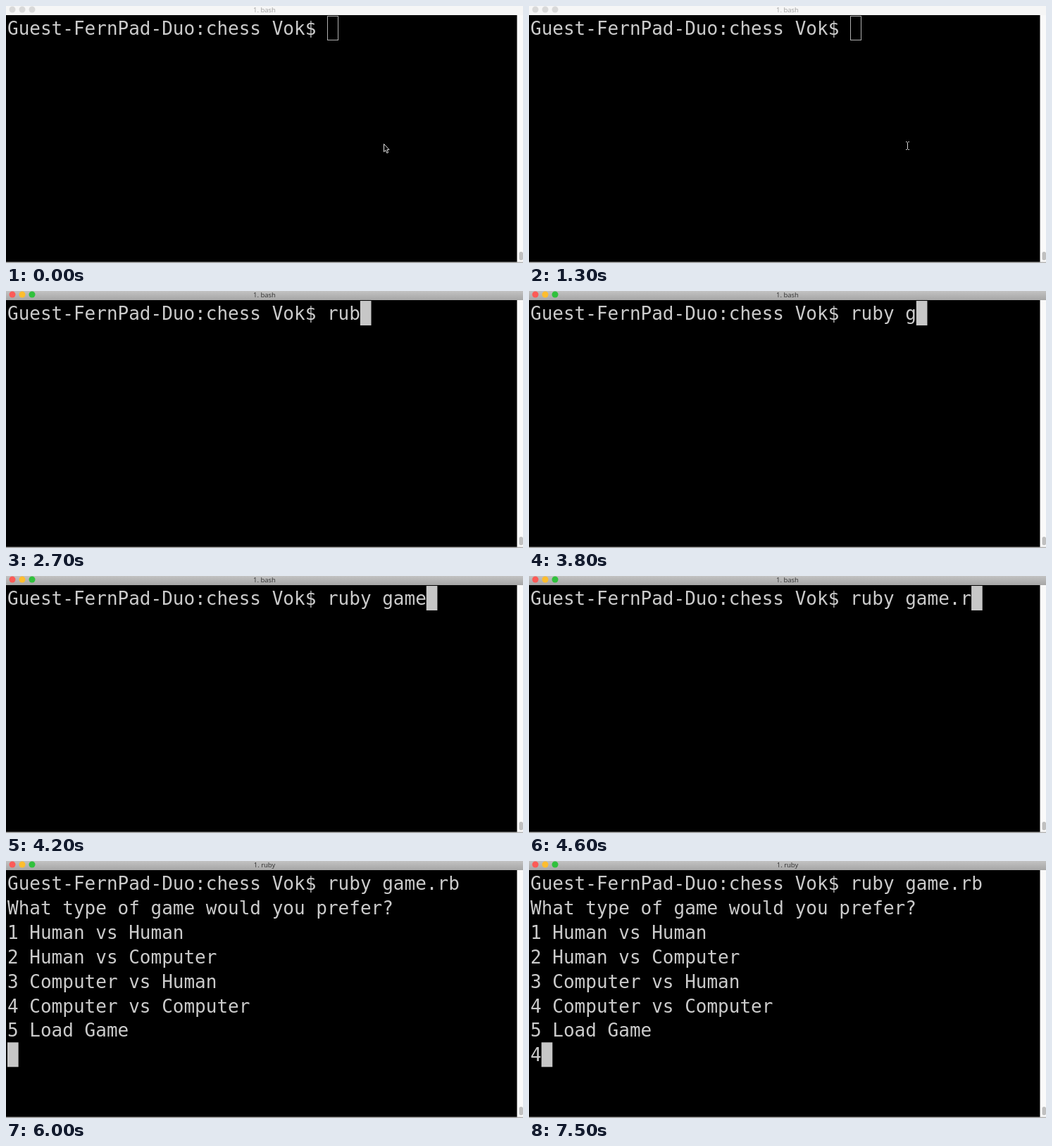
Write an HTML page that moves like this. It is 734 by 366 pixels and loops after 8 s.

```html
<!DOCTYPE html>
<html lang="en">
<head>
<meta charset="utf-8">
<title>Terminal</title>
<style>
  html, body { margin: 0; width: 100%; height: 100%; overflow: hidden; background: #000; }
  svg { display: block; }
  .term { font: 26px "DejaVu Sans Mono", monospace; fill: #cbcbcb; white-space: pre; }
  .title { font: 9.5px "Open Sans", sans-serif; text-anchor: middle; }
</style>
</head>
<body>
<svg width="734" height="366" viewBox="0 0 734 366">
  <defs>
    <linearGradient id="bar" x2="0" y2="1">
      <stop offset="0" stop-color="#c2c2c2"/>
      <stop offset="1" stop-color="#a6a6a6"/>
    </linearGradient>
  </defs>
  <rect width="734" height="366"/>
  <rect id="head" width="734" height="13"/>
  <g id="dots"></g>
  <text id="title" class="title" x="367" y="8.5"></text>

  <rect x="725.5" y="13" width="8.5" height="353" fill="#fafafa"/>
  <rect x="728.5" y="350" width="5.5" height="12" rx="2.5" fill="#c0c0c0"/>
  <rect y="364.5" width="734" height="1.5" fill="#b5b5b5"/>

  <g id="lines" class="term"></g>
  <rect id="caret"/>
  <path id="arrow" d="M536.5 196.5v11.2l2.5-2.3 1.8 4 1.9-.9-1.8-3.8h3.2z"
        fill="#000" stroke="#e4e4e4" stroke-width="1"/>
  <path id="beam" d="M535 193.5h1.5l1 1 1-1h1.5M537.5 194.5v9M535 204.5h1.5l1-1 1 1h1.5"
        fill="none" stroke="#d8d8d8" stroke-width="1"/>
</svg>
<script>
const LOOP = 8000;
const CELL = 15.652, ROW = 34.9, LEFT = 2, TOP = 14, BASE = 41;
const FOCUS = 1400, BEAM = 1000, ENTER = 5200, OUTPUT = 5300, RENAME = 6000, ANSWER = 7500;

const prompt = "Guest-FernPad-Duo:chess Vok$ ";
const command = "ruby game.rb";
const keyTimes = [1700, 2500, 2600, 2800, 3600, 3700, 3900, 4000, 4200, 4400, 4600, 4800];
const menu = [
  "What type of game would you prefer?",
  "1 Human vs Human",
  "2 Human vs Computer",
  "3 Computer vs Human",
  "4 Computer vs Computer",
  "5 Load Game"
];

const $ = id => document.getElementById(id);
const set = (el, attrs) => { for (const k in attrs) el.setAttribute(k, attrs[k]); };
const show = (el, on) => set(el, { visibility: on ? "visible" : "hidden" });
function add(parent, tag, attrs) {
  const el = document.createElementNS("http://www.w3.org/2000/svg", tag);
  set(el, attrs);
  parent.appendChild(el);
  return el;
}

const dotColors = ["#fc5b57", "#fdbd2f", "#30c13d"];
const dots = dotColors.map((c, i) => add($("dots"), "circle", { cx: 9 + 14 * i, cy: 5, r: 4.5 }));
const rows = Array.from({ length: 8 }, (_, i) =>
  add($("lines"), "text", { x: LEFT, y: BASE + i * ROW }));

function screenText(t) {
  const typed = keyTimes.filter(k => t >= k).length;
  const out = [prompt + command.slice(0, typed)];
  if (t >= OUTPUT) out.push(...menu);
  if (t >= ENTER) out.push(t >= ANSWER ? "4" : "");
  return out;
}

function draw(t) {
  const active = t >= FOCUS;
  set($("head"), { fill: active ? "url(#bar)" : "#f6f6f6" });
  set($("title"), { fill: active ? "#303030" : "#a0a0a0" });
  $("title").textContent = t >= RENAME ? "1. ruby" : "1. bash";
  dots.forEach((d, i) => set(d, { fill: active ? dotColors[i] : "#d9d9d9" }));

  const text = screenText(t);
  rows.forEach((row, i) => { row.textContent = text[i] || ""; });

  const last = text.length - 1;
  const x = LEFT + text[last].length * CELL;
  const y = TOP + last * ROW;
  set($("caret"), active
    ? { x, y, width: CELL, height: 35, fill: "#c7c7c7", stroke: "none" }
    : { x: Math.round(x) + .5, y: y + .5, width: 15, height: 34, fill: "none", stroke: "#b0b0b0" });

  show($("arrow"), t < BEAM);
  show($("beam"), t >= BEAM && t < keyTimes[0]);
}

const start = performance.now();
function tick() {
  draw((performance.now() - start) % LOOP);
  requestAnimationFrame(tick);
}
tick();
</script>
</body>
</html>
```
